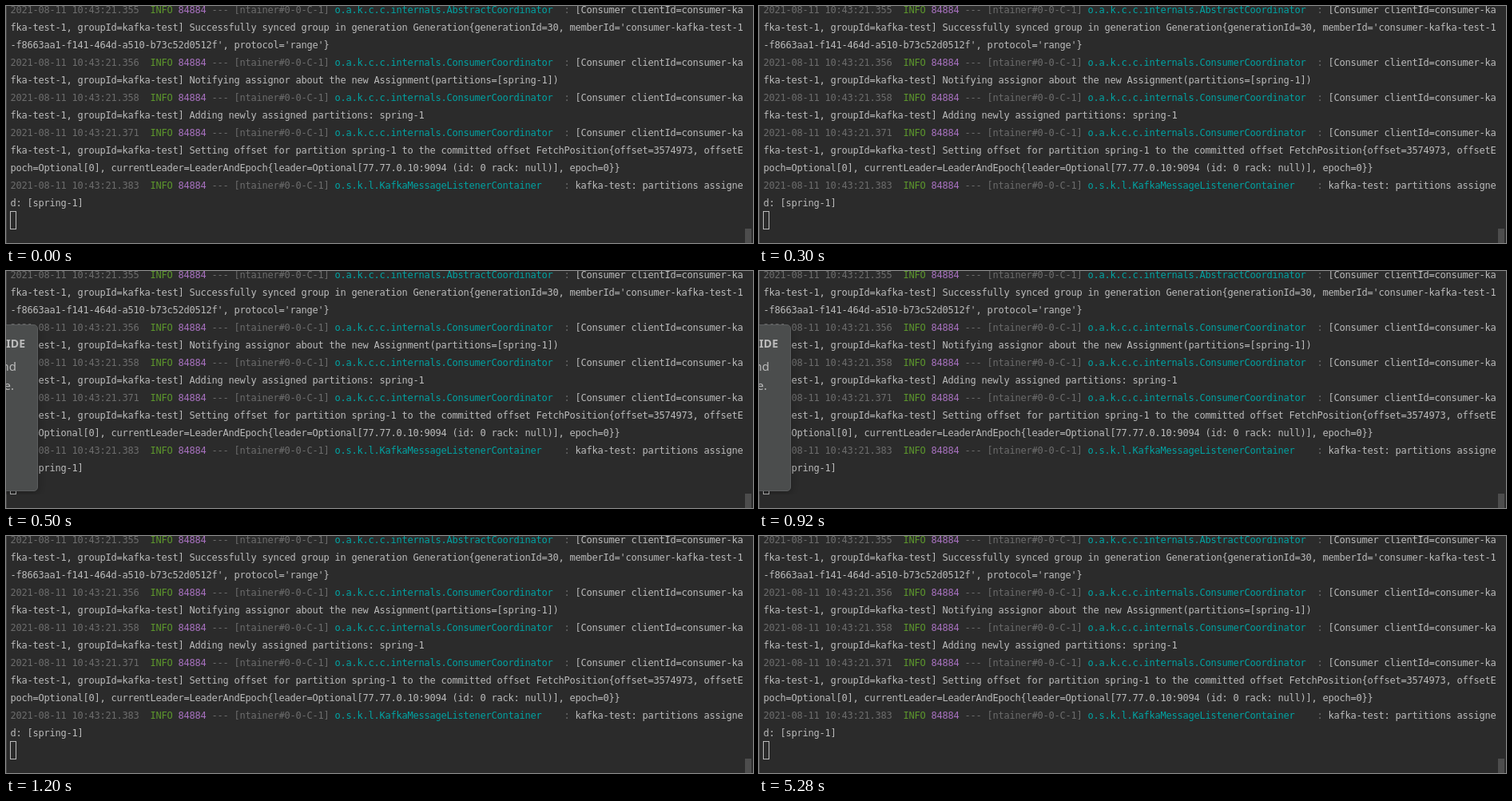
An HTML page that plays this animation: 935 by 297 pixels, repeating every 8000 ms.

```html
<!DOCTYPE html>
<html lang="en">
<head>
<meta charset="utf-8">
<title>Console log</title>
<style>
  html, body { margin: 0; width: 100%; height: 100%; overflow: hidden; background: #2b2b2b; }
  #edge { position: absolute; left: 0; top: 0; width: 1px; height: 100%; background: #4a4a4a; }
  #log {
    position: absolute; left: 5.5px; top: -6px; margin: 0; color: #bbb;
    font: 12px/22px "DejaVu Sans Mono", monospace; font-variant-ligatures: none;
    letter-spacing: calc(7px - 1ch);
  }
  .dim { color: #6c6c6c; }
  .level { color: #5c962c; }
  .pid { color: #a771bf; }
  .logger { color: #00a3a3; }
  #caret {
    position: absolute; left: 5px; top: 257px; width: 8px; height: 23px;
    box-sizing: border-box; border: 1px solid #bbb;
  }
  #thumb { position: absolute; left: 925px; top: 279px; width: 8px; height: 18px; background: #4d4d4d; }
  #layer { position: absolute; left: 0; top: 67px; width: 54px; height: 213px; overflow: hidden; }
  #popup {
    position: absolute; left: -300px; top: 0; width: 340px; height: 209px; box-sizing: border-box;
    background: #4b4d4d; border: 1px solid #5c5e5f; border-radius: 5px;
    box-shadow: 0 2px 10px rgba(0, 0, 0, .3);
    color: #bbb; font: 15px/24px "Noto Sans", "Open Sans", sans-serif;
  }
  #popup > * { position: absolute; white-space: pre; }
  #popup b { right: 15px; top: 11px; font-size: 14px; }
  #popup .first { right: 26px; top: 39px; }
  #popup .second { right: 29px; top: 63px; }
</style>
</head>
<body>
<div id="edge"></div>
<pre id="log"></pre>
<div id="caret"></div>
<div id="thumb"></div>
<div id="layer">
  <div id="popup"><b>IDE</b><span class="first">nd</span><span class="second">e.</span></div>
</div>
<script>
const COLUMNS = 131, LOOP = 8000, SHOW = 500, HIDE = 1200;
const client = "[Consumer clientId=consumer-kafka-test-1, groupId=kafka-test] ";
const kafka = "o.a.k.c.c.internals.";
const entries = [
  [355, kafka + "AbstractCoordinator", client + "Successfully synced group in generation Generation{generationId=30, memberId='consumer-kafka-test-1-f8663aa1-f141-464d-a510-b73c52d0512f', protocol='range'}"],
  [356, kafka + "ConsumerCoordinator", client + "Notifying assignor about the new Assignment(partitions=[spring-1])"],
  [358, kafka + "ConsumerCoordinator", client + "Adding newly assigned partitions: spring-1"],
  [371, kafka + "ConsumerCoordinator", client + "Setting offset for partition spring-1 to the committed offset FetchPosition{offset=3574973, offsetEpoch=Optional[0], currentLeader=LeaderAndEpoch{leader=Optional[77.77.0.10:9094 (id: 0 rack: null)], epoch=0}}"],
  [383, "o.s.k.l.KafkaMessageListenerContainer", "kafka-test: partitions assigned: [spring-1]"]
];

const log = document.getElementById("log");
const layer = document.getElementById("layer");
let column = 0;

// Adds coloured text, breaking it at the console width.
function write(text, style = "") {
  let wrapped = "";
  for (const char of text) {
    if (column === COLUMNS) { wrapped += "\n"; column = 0; }
    wrapped += char;
    column++;
  }
  const span = document.createElement("span");
  span.className = style;
  span.textContent = wrapped;
  log.append(span);
}

for (const [ms, logger, message] of entries) {
  write(`2021-08-11 10:43:21.${ms}  `, "dim");
  write("INFO ", "level");
  write("84884 ", "pid");
  write("--- [ntainer#0-0-C-1] ", "dim");
  write(logger.padEnd(41), "logger");
  write(": ", "dim");
  write(message);
  log.append("\n");
  column = 0;
}

const start = performance.now();
function draw() {
  const time = (performance.now() - start) % LOOP;
  layer.style.visibility = time >= SHOW && time < HIDE ? "visible" : "hidden";
  requestAnimationFrame(draw);
}
draw();
</script>
</body>
</html>
```
